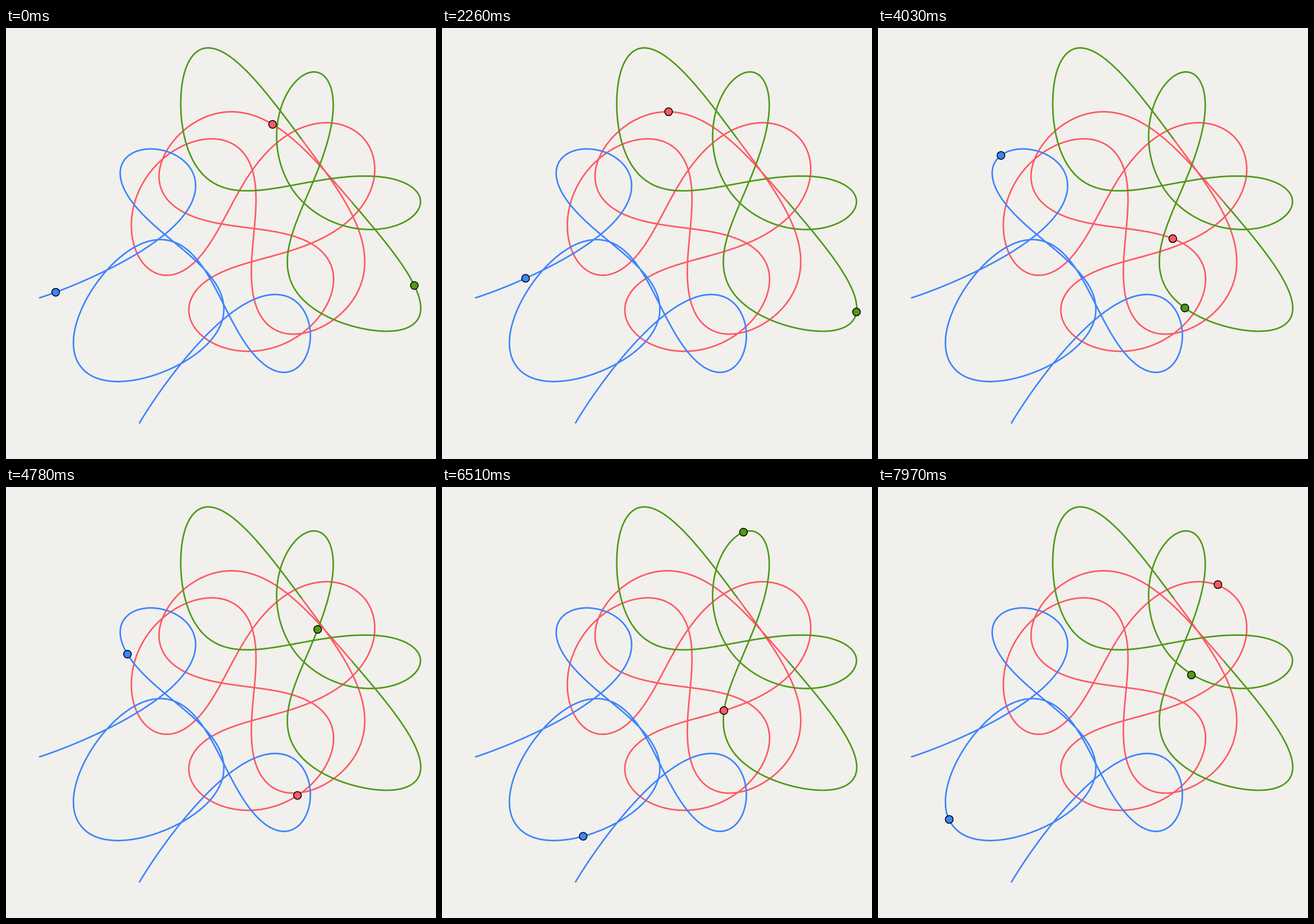
Animation of 748x749 px, one loop 7.99 s. Source, as an HTML page with a canvas:

```html
<!DOCTYPE html>
<html lang="en">
<head>
<meta charset="utf-8">
<title>Three bodies</title>
<style>
  html, body { margin: 0; width: 100%; height: 100%; overflow: hidden; background: #f1f0ec; }
  canvas { display: block; }
</style>
</head>
<body>
<canvas id="stage" width="748" height="749"></canvas>
<script>
// Three equal masses under gravity. Red and green fly out of a head-on
// collision while blue starts at rest; the second half of the orbit mirrors the first.
const LOOP = 7990, DT = 4, LAUNCH = 20;
const COLORS = ['#ff5964', '#4f9a18', '#3d84ff'];
const BLUE_START = [54.5, 466.5], BLUE_END = [234.5, 691.5];

// Waypoints: time, then x, y of red, green and blue.
const WAYPOINTS = [
  [0, 458, 163.5, 714, 455, 88, 455],
  [1440, 498.5, 191.5, 694.5, 419.5, 67.5, 462.5],
  [3080, 282, 213.5, 679, 525.5, 299.5, 334.5],
  [4030, 516, 364.5, 533, 484, 212, 225.5],
  [5530, 372, 551, 566.5, 124, 322, 399],
  [6510, 484, 392, 526, 76.5, 250.5, 605.5],
  [7970, 591.5, 170, 546.5, 324, 122.5, 580],
];

// Parameters: collision time, gravity, collision angle, binding term, blue's rest position
// relative to the centre of mass, centre of mass, time from collision to the mirror point.
const GUESS = [885, 14.45, 0.8665, -0.0083, -365.6, 108.6, 420.1, 357.9, 6900];
const NUDGE = [0.5, 0.003, 1e-4, 1e-5, 0.1, 0.1, 0.1, 0.1, 0.5];

// State: red x, y, blue x, y and their velocities, relative to the centre of mass.
function launch([, g, angle, bind, bx, by], t) {
  const a = Math.cbrt(9 * g), u = Math.cbrt(t);
  const gap = (a * u ** 2 + bind * u ** 4) / 2;
  const rate = (2 * a / u + 4 * bind * u) / 6;
  const k = 4 * g / 9 / Math.hypot(bx, by) ** 3;
  const near = 1 - k * t * t, drift = -2 * k * t;
  const c = Math.cos(angle), s = Math.sin(angle);
  return [
    -bx * near / 2 - gap * c, -by * near / 2 - gap * s, bx * near, by * near,
    -bx * drift / 2 - rate * c, -by * drift / 2 - rate * s, bx * drift, by * drift,
  ];
}

function derivative(s, g) {
  const [rx, ry, bx, by] = s;
  const pull = (x, y) => { const d = x * x + y * y; return g / (d * Math.sqrt(d)); };
  const rbx = bx - rx, rby = by - ry;
  const rgx = -2 * rx - bx, rgy = -2 * ry - by;
  const bgx = -2 * bx - rx, bgy = -2 * by - ry;
  const rb = pull(rbx, rby), rg = pull(rgx, rgy), bg = pull(bgx, bgy);
  return [s[4], s[5], s[6], s[7],
    rb * rbx + rg * rgx, rb * rby + rg * rgy,
    bg * bgx - rb * rbx, bg * bgy - rb * rby];
}

function step(s, h, g) {
  const add = (d, f) => s.map((v, i) => v + d[i] * f);
  const k1 = derivative(s, g);
  const k2 = derivative(add(k1, h / 2), g);
  const k3 = derivative(add(k2, h / 2), g);
  const k4 = derivative(add(k3, h), g);
  return s.map((v, i) => v + h / 6 * (k1[i] + 2 * k2[i] + 2 * k3[i] + k4[i]));
}

function simulate(p, duration) {
  const states = [launch(p, LAUNCH)];
  for (let t = LAUNCH; t < duration; t += DT) states.push(step(states[states.length - 1], DT, p[1]));
  return { p, states };
}

function stateAt({ p, states }, t) {
  if (t <= LAUNCH) return launch(p, t);
  const i = Math.min(Math.floor((t - LAUNCH) / DT), states.length - 1);
  return step(states[i], t - LAUNCH - i * DT, p[1]);
}

// Red, green and blue positions relative to the centre of mass.
function positions(orbit, t) {
  const [rx, ry, bx, by] = stateAt(orbit, t);
  return [[rx, ry], [-rx - bx, -ry - by], [bx, by]];
}

// Reflection in the line on which all bodies lie at the mirror point.
function reflection(angle) {
  const c = Math.cos(2 * angle), s = Math.sin(2 * angle);
  return ([x, y]) => [x * c + y * s, x * s - y * c];
}

// How far the bodies are from crossing the mirror line together at right angles.
function mirrorErrors(orbit) {
  const [, , , , restX, restY, cx, cy, middle] = orbit.p;
  const [rx, ry, bx, by, rvx, rvy, bvx, bvy] = stateAt(orbit, middle);
  const angle = Math.atan2(by, bx), c = Math.cos(angle), s = Math.sin(angle);
  const [endX, endY] = reflection(angle)([restX, restY]);
  const perMs = 1000;
  return [2 * (ry * c - rx * s), perMs * (rvx * c + rvy * s), perMs * (bvx * c + bvy * s),
    endX + cx - BLUE_END[0], endY + cy - BLUE_END[1]];
}

function residuals(p, count) {
  const [t0, , , , bx, by, cx, cy] = p;
  const goals = WAYPOINTS.slice(0, count);
  const orbit = simulate(p, Math.max(...goals.map(w => Math.abs(w[0] - t0))));
  const out = [bx + cx - BLUE_START[0], by + cy - BLUE_START[1]];
  for (const [t, ...xy] of goals) {
    positions(orbit, Math.abs(t - t0)).forEach(([x, y], i) =>
      out.push(x + cx - xy[2 * i], y + cy - xy[2 * i + 1]));
  }
  if (count === WAYPOINTS.length) out.push(...mirrorErrors(orbit));
  return out;
}

const dot = (a, b) => a.reduce((sum, v, i) => sum + v * b[i], 0);

function solve(matrix, vector) {
  const n = vector.length, m = matrix.map((row, i) => [...row, vector[i]]);
  for (let c = 0; c < n; c++) {
    let best = c;
    for (let r = c + 1; r < n; r++) if (Math.abs(m[r][c]) > Math.abs(m[best][c])) best = r;
    [m[c], m[best]] = [m[best], m[c]];
    for (let r = 0; r < n; r++) {
      if (r === c) continue;
      const f = m[r][c] / m[c][c];
      for (let k = c; k <= n; k++) m[r][k] -= f * m[c][k];
    }
  }
  return m.map((row, i) => row[n] / row[i]);
}

// Levenberg-Marquardt refinement against the first `count` waypoints, in units of NUDGE.
function refine(p, count, rounds) {
  let r = residuals(p, count), cost = dot(r, r), damping = 1e-3;
  for (let n = 0; n < rounds; n++) {
    const slopes = NUDGE.map((h, i) =>
      residuals(p.map((v, k) => k === i ? v + h : v), count).map((v, k) => v - r[k]));
    const gradient = slopes.map(s => -dot(s, r));
    const before = cost;
    for (let attempt = 0; attempt < 8 && cost === before; attempt++) {
      const normal = slopes.map((a, i) => slopes.map((b, j) =>
        i === j ? dot(a, a) * (1 + damping) + 1e-12 : dot(a, b)));
      const change = solve(normal, gradient);
      const q = p.map((v, i) => v + change[i] * NUDGE[i]);
      const next = q[1] > 5 && q[1] < 40 ? residuals(q, count) : [Infinity];
      if (dot(next, next) < cost) {
        p = q; r = next; cost = dot(r, r); damping /= 8;
      } else damping *= 8;
    }
    if (before - cost < 1e-4 * before) break;
  }
  return p;
}

let params = GUESS;
for (let count = 2; count <= WAYPOINTS.length; count++) {
  params = refine(params, count, count < WAYPOINTS.length ? 10 : 40);
}
const [collision, , , , , , centerX, centerY, middle] = params;
const orbit = simulate(params, LOOP - collision);
const [, , axisX, axisY] = stateAt(orbit, middle);
const mirror = reflection(Math.atan2(axisY, axisX));

const half = [];
for (let t = 0; t < middle; t += DT) half.push(positions(orbit, t));
half.push(positions(orbit, middle));

const ctx = document.getElementById('stage').getContext('2d');
const trails = COLORS.map((_, i) => {
  const first = half.map(bodies => bodies[i]);
  const path = new Path2D();
  for (const [x, y] of [...first, ...first.map(mirror).reverse()]) path.lineTo(x + centerX, y + centerY);
  return path;
});

function draw(t) {
  ctx.fillStyle = '#f1f0ec';
  ctx.fillRect(0, 0, 748, 749);
  ctx.lineJoin = 'round';
  ctx.lineWidth = 2.7;
  trails.forEach((path, i) => {
    ctx.strokeStyle = COLORS[i];
    ctx.stroke(path);
  });
  ctx.lineWidth = 1.5;
  ctx.strokeStyle = '#000';
  positions(orbit, Math.abs(t - collision)).forEach(([x, y], i) => {
    ctx.beginPath();
    ctx.arc(x + centerX, y + centerY, 6.75, 0, 2 * Math.PI);
    ctx.fillStyle = COLORS[i];
    ctx.fill();
    ctx.stroke();
  });
}

const start = performance.now();
function frame() {
  draw((performance.now() - start) % LOOP);
  requestAnimationFrame(frame);
}
frame();
</script>
</body>
</html>
```
